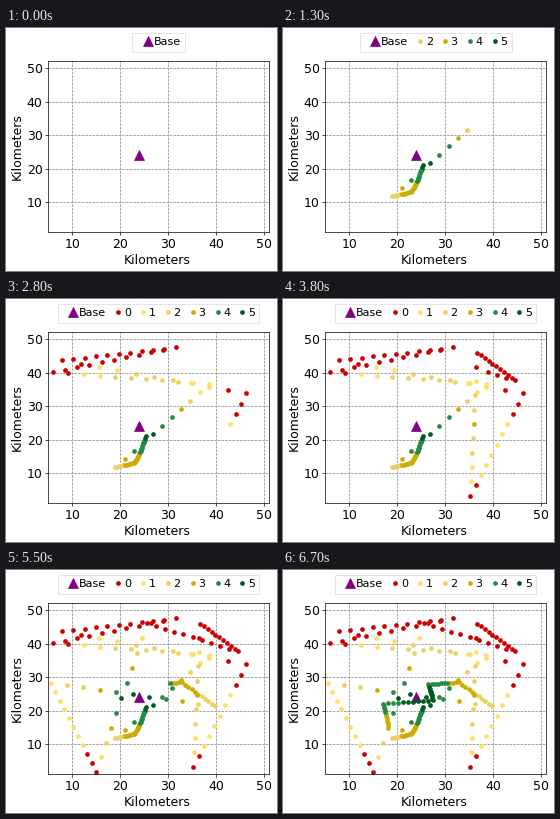
A matplotlib script for the animation above (6.8 s loop, 271 by 243 pixels).

```python
import matplotlib.pyplot as plt
import numpy as np
from matplotlib.animation import FuncAnimation

W, H, DPI = 271, 243, 100
FRAMES, INTERVAL = 68, 100
POINTS_PER_FRAME = 3
STEPS_PER_LEG = 10

BASE = 24 + 24j
BAND_KM = 4
COLORS = ["#cc0000", "#ffe066", "#ebd164", "#ccac00", "#238b45", "#005a20"]

# Turning points of the route in km, x + yj
TURNS = [25.3 + 21j, 24.1 + 16.2j, 22.9 + 13.1j, 19 + 11.8j, 38.5 + 36.6j,
         5.9 + 40.2j, 31.5 + 47.5j, 7.9 + 43.7j, 46.2 + 33.8j, 35.2 + 3.3j,
         36.6 + 46j, 44.6 + 37.7j, 25.5 + 46.1j, 15 + 1.6j, 5.5 + 28.4j,
         39.7 + 21.4j, 32.8 + 28.5j, 26.5 + 27.9j, 27.4 + 23.1j,
         17.1 + 22.1j, 18.1 + 15.8j]

# Every leg takes the same time, whatever its length
legs = len(TURNS) - 1
route = np.interp(np.linspace(0, legs, legs * STEPS_PER_LEG + 1),
                  range(legs + 1), TURNS)
level = 5 - np.minimum(abs(route - BASE) // BAND_KM, 5).astype(int)

plt.rcParams.update({"font.family": "DejaVu Sans", "font.size": 9,
                     "axes.linewidth": 0.5, "patch.linewidth": 0.6})
fig = plt.figure(figsize=(W / DPI, H / DPI), dpi=DPI, facecolor="white")
ax = fig.add_axes([42.2 / W, 38.6 / H, 221 / W, 171 / H])
ax.set(xlim=(5, 51), ylim=(1, 52),
       xticks=range(10, 51, 10), yticks=range(10, 51, 10))
ax.tick_params(length=2, width=0.5, pad=2)
ax.grid(color="gray", linestyle="--", linewidth=0.5)
ax.set_axisbelow(True)


def axis_title(x, y, **kw):
    fig.text(x / W, 1 - y / H, "Kilometers", ha="center", va="baseline",
             rotation_mode="anchor", **kw)


axis_title(151.5, 235.5)
axis_title(14.5, 119, rotation=90)

base, = ax.plot(BASE.real, BASE.imag, "^", color="purple", ms=7, mew=0.5,
                label="Base")
dots = [ax.plot([], [], "o", color=c, ms=3.4, mew=0, label=str(i))[0]
        for i, c in enumerate(COLORS)]


def draw(frame):
    count = frame * POINTS_PER_FRAME
    handles = [base]
    for i, line in enumerate(dots):
        pts = route[:count][level[:count] == i]
        line.set_data(pts.real, pts.imag)
        if len(pts):
            handles.append(line)
    ax.legend(handles=handles, loc="lower center", bbox_to_anchor=(0.5, 1.024),
              ncol=len(handles), fontsize=8, handletextpad=-0.5,
              columnspacing=0.1, fancybox=False, edgecolor="0.85")
    return dots


anim = FuncAnimation(fig, draw, frames=FRAMES, interval=INTERVAL,
                     init_func=lambda: draw(0), repeat=True, repeat_delay=0)
plt.show()
```
